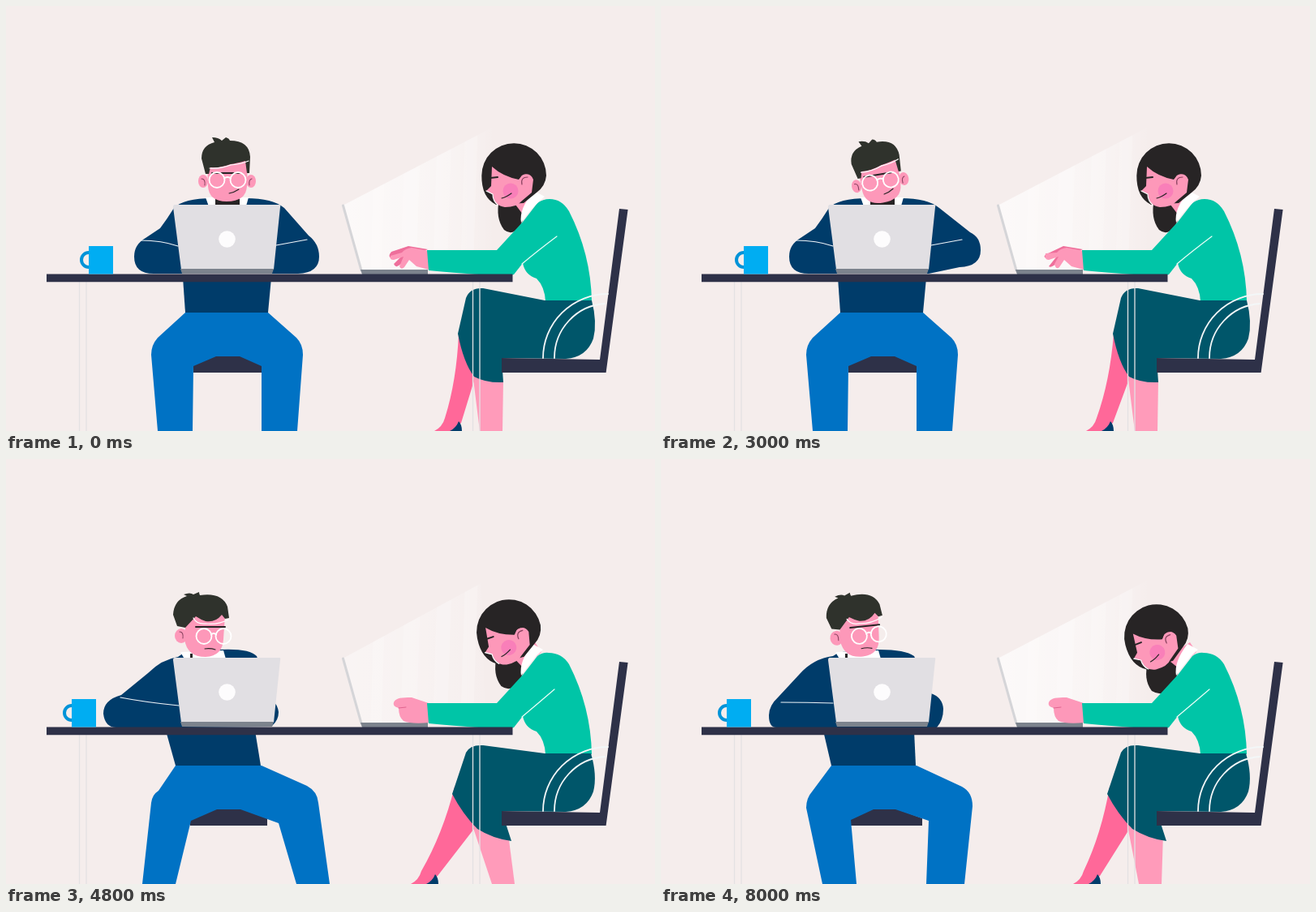
Recreate the animation shown at these times as an HTML page with a canvas. Size 800 by 524 pixels, loop 8.08 s.

```html
<!DOCTYPE html>
<html lang="en">
<head>
<meta charset="utf-8">
<title>Two people at a desk</title>
<style>
html, body { margin: 0; width: 100%; height: 100%; overflow: hidden; background: #f5edec; }
canvas { display: block; }
</style>
</head>
<body>
<canvas id="stage" width="800" height="524"></canvas>
<script>
const ctx = document.getElementById('stage').getContext('2d');
const LOOP = 8080;
const BG = '#f5edec', INK = '#2e3148', NAVY = '#003c6a', BLUE = '#0072c4', SKIN = '#fd98b9',
  ROSE = '#ff6899', BLACK = '#272425', HAIR = '#2f322c', GREEN = '#00c5a7', TEAL = '#00566a',
  STEEL = '#7c838d';

const clamp = v => Math.max(0, Math.min(1, v));
const ease = u => { u = clamp(u); return u * u * (3 - 2 * u); };
const lerp = (a, b, u) => a + (b - a) * u;

// Blend two paths that share the same commands.
function mix(a, b, u) {
  if (u === 0 || a === b) return a;
  const nums = b.match(/-?[\d.]+/g);
  let i = 0;
  return a.replace(/-?[\d.]+/g, n => lerp(+n, +nums[i++], u).toFixed(2));
}

// Eased values of a track of [time, ...values] keys.
function track(t, keys) {
  let i = 0;
  while (i < keys.length - 2 && t >= keys[i + 1][0]) i++;
  const [a, b] = [keys[i], keys[i + 1]];
  const u = ease((t - a[0]) / (b[0] - a[0]));
  return a.slice(1).map((v, k) => lerp(v, b[k + 1], u));
}

function fill(color, d) {
  ctx.fillStyle = color;
  ctx.fill(new Path2D(d));
}
function line(color, width, d) {
  ctx.strokeStyle = color;
  ctx.lineWidth = width;
  ctx.stroke(new Path2D(d));
}
function oval(color, x, y, rx, ry = rx) {
  ctx.fillStyle = color;
  ctx.beginPath();
  ctx.ellipse(x, y, rx, ry, 0, 0, 7);
  ctx.fill();
}
function ring(color, width, x, y, r) {
  ctx.strokeStyle = color;
  ctx.lineWidth = width;
  ctx.beginPath();
  ctx.arc(x, y, r, 0, 7);
  ctx.stroke();
}
function posed(cx, cy, [dx, dy, deg], draw) {
  ctx.save();
  ctx.translate(cx + dx, cy + dy);
  ctx.rotate(deg * Math.PI / 180);
  ctx.translate(-cx, -cy);
  draw();
  ctx.restore();
}

// Poses in order: working, jolt, slouch, rest
const pants = [
  'M221,378 L323,378 L358,409 Q366,417 366,430 L359,524 L315,524 L315,444 L288,432 L259,432 L231,444 L230,524 L187,524 L179,430 Q179,418 187,409 Z',
  'M214,378 L319,378 L366,404 Q375,410 376,422 L380,524 L340,524 L327,447 L289,432 L260,432 L228,446 L218,524 L172,524 L179,424 Q180,412 188,406 Z',
  'M209,378 L315,378 L371,403 Q384,410 385,424 L399,524 L358,524 L336,449 L289,432 L260,432 L228,446 L209,524 L168,524 L179,424 Q180,414 188,409 Z',
  'M210,378 L315,378 L371,404 Q384,411 384,428 L374,524 L327,524 L330,446 L289,432 L262,432 L234,445 L241,524 L199,524 L179,430 Q179,418 187,409 Z'];
const waist = [
  'M218,335 L327,335 L323,378 L221,378 Z',
  'M203,335 L313,335 L319,378 L214,378 Z',
  'M197,335 L307,335 L314,378 L209,378 Z',
  'M200,335 L312,335 L314,378 L210,378 Z'];
const seat = [
  'M231,443 L259,431 L289,431 L315,443 L315,452 L231,452 Z',
  'M227,445 L259,431 L289,431 L322,443 L322,452 L227,452 Z',
  'M227,445 L259,431 L289,431 L322,443 L322,452 L227,452 Z',
  'M233,444 L262,431 L289,431 L322,443 L322,452 L233,452 Z'];
const working = (l, r) =>
  `M260,237 Q220,236 207,249 Q199,262 190,274 L${172 - l},286 Q${158 - l},294 ${158 - l},309 Q${158 - l},330 182,330 L216,330 L330,330 L${360 + r},${330 - r} Q${386 + r},${329 - r} ${386 + r},${309 - r} Q${386 + r},${293 - r} ${373 + r},${283 - r / 2} L343,249 Q328,236 290,237 Z`;
const leaning = [
  'M235,238 Q220,236 212,243 Q196,252 181,267 L154,291 Q132,305 132,320 Q132,333 140,333 L216,333 L330,316 L352,311 Q371,304 371,288 Q370,274 357,267 L311,242 Q300,234 262,235 Z',
  'M235,238 Q222,236 212,244 Q192,247 175,264 L142,291 Q120,297 120,314 Q122,331 136,331 L216,331 L325,330 L328,329 Q336,322 336,312 Q335,303 328,297 L309,243 Q300,233 262,235 Z',
  'M235,238 Q222,236 212,243 Q188,246 171,265 L145,293 Q133,304 133,316 Q133,331 142,331 L216,331 L330,331 L340,331 Q348,322 348,308 Q347,294 333,289 L312,243 Q300,234 262,235 Z'];
const seams = [
  'M166,289 Q192,289 212,296 M333,295 L371,288',
  'M142,302 Q180,300 213,301 M338,268 L346,265',
  'M141,294 Q172,300 213,304 M326,300 L326,300',
  'M148,300 Q180,300 212,301 M326,292 L326,292'];
const skirt = [
  'M567,360 Q572,347 588,348 L664,363 L722,363 Q729,390 724,410 Q716,433 690,435 L611,434 L613,464 Q592,465 577,457 Q564,440 557,404 Z',
  'M567,362 Q572,352 588,353 L664,363 L721,363 Q729,390 724,410 Q716,433 690,435 L611,434 L623,471 Q600,468 581,456 Q563,438 550,413 Z'];

// Front view, then turned view
const hair = [
  'M246,207 L241,188 Q241,172 257,168 L254,162 Q262,162 266,166 L271,162 Q275,163 276,166 Q300,166 301,186 L300,206 L297,206 L295,191 Q284,194 277,195 Q264,200 252,199 L250,207 Z',
  'M211,206 L206,192 Q207,174 223,169 L219,167 Q227,164 231,167 L238,164 Q238,166 239,168 Q266,164 273,182 L275,196 L270,197 L266,192 Q258,202 246,200 Q240,198 234,194 L221,208 Z'];
const face = [
  'M248,190 L249,222 Q250,241 272,241 Q296,241 297,222 L298,190 Z',
  'M222,192 L220,222 Q223,244 246,244 Q267,243 268,222 L270,192 Z'];
const fringe = [
  'M251,200 Q264,201 277,196 Q290,195 299,191',
  'M231,196 Q235,204 246,203 Q260,205 274,198'];
const brow = ['M254,206 L288,206', 'M234,207 L270,207'];
const mouth = ['M275,231 Q281,230 287,226', 'M245,234 Q252,233 258,235'];

function man(t, pose, turn, typing) {
  fill(INK, pose(seat));
  fill(NAVY, pose(waist));
  fill(BLUE, pose(pants));
  fill(NAVY, pose([working(6 * typing.left, 8 * typing.right), ...leaning]));
  line('#eef2f7', 1.2, pose(seams));
  fill('#fff', mix('M246,236 L299,236 L295,250 L251,250 Z', 'M215,238 L268,236 L272,250 L222,250 Z', turn));
  fill(BLACK, mix('M258,236 L288,236 L288,250 L258,250 Z', 'M227,240 L230,240 L230,250 L227,250 Z', turn));

  const move = track(t, [[0, 0, 0, 0], [520, 0, 0, 0], [1680, -3, 0, -1], [3000, -4, 2, -9],
    [3920, -8, 4, -8], [4800, 0, 0, 0], [6200, 7, 0, 3], [7080, -1, 0, -6], [LOOP, -1, 0, -6]]);
  posed(lerp(271, 244, turn), 205, move, () => {
    const x = (a, b) => lerp(a, b, turn);
    const ear = x(243, 216), y = x(214.5, 218.5), left = x(260, 244), right = x(286, 268);
    oval(SKIN, x(302, 260), 216, 6, 8);
    oval(SKIN, ear, x(216, 218), x(6, 8), x(8, 9));
    fill(SKIN, mix(...face, turn));
    fill(HAIR, mix(...hair, turn));
    line('#fff', 1.2, mix(...fringe, turn));
    line(BLACK, 2, mix(...brow, turn));
    line(BLACK, 1.1, mix(...mouth, turn));
    line('#8a4360', 1.1, `M${ear - 2},213 Q${ear + 3},213 ${ear + 2},221`);
    if (turn < .5) line('#8a4360', 1.1, 'M303,213 Q299,214 300,221');
    ring('#fff', 1.8, left, y, 9.5);
    ring('#fff', 1.8, right, y, 9.5);
    line('#fff', 1.8, `M${left + 9},${y - 2} Q${(left + right) / 2},${y - 5} ${right - 9},${y - 2}`);
  });
}

function beam(jolt, slump) {
  const open = mix('M415,246 L599,150 L604,300 L522,325 L438,325 Z',
    'M415,246 L586,153 L590,300 L522,325 L438,325 Z', slump);
  const shape = mix(open, 'M423,243 L586,176 L586,300 L522,325 L438,325 Z', jolt);
  const light = ctx.createLinearGradient(420, 0, 603, 0);
  const glow = 1 - .4 * slump;
  [[0, .68], [.4, .55], [.75, .33], [1, 0]].forEach(([p, a]) =>
    light.addColorStop(p, `rgba(255,255,255,${a * glow})`));
  fill(light, shape);
  ctx.save();
  ctx.clip(new Path2D(shape));
  for (const [x, w] of [[455, 14], [492, 20], [532, 18], [566, 16]])
    fill('rgba(255,255,255,.16)', `M${x},140 h${w} l-6,190 h${-w} Z`);
  ctx.restore();
  line('#d5d5d8', 3, mix('M415.5,246 L438,326', 'M424.5,243 L438,326', jolt));
  fill(STEEL, 'M437,325 L520,325 L520,331 L439,331 Z');
}

function hands(t, reach, typing) {
  if (t > 3450) {
    fill(SKIN, 'M521,301 L500,294 Q480,293 478,300 Q476,305 484,307 Q484,318 490,323 Q500,327 521,325 Z');
    line('#e0648f', 1, 'M484,307 L493,306');
    return;
  }
  const tap = 3 * typing.right;
  ctx.save();
  ctx.translate(reach, 0);
  fill('#ee6f9b', `M520,300 L496,296 L475,${303 + tap} Q470,309 475,311 L490,306 L478,${318 + tap} Q480,323 484,320 L500,309 Z`);
  fill(SKIN, `M521,302 L500,298 Q492,299 488,304 L474,${308 - tap} Q472,313 478,313 L490,309 L485,${321 - tap} Q487,326 491,322 L497,313 L506,321 L521,325 Z`);
  ctx.restore();
}

function woman(t, lean, typing) {
  const move = track(t, [[0, 0, 0, 0], [3120, 0, 0, 0], [3920, -15, 10, -15], [4800, -6, 4, -12],
    [6200, -20, 17, -24], [7080, -15, 10, -15], [LOOP, -15, 10, -15]]);
  const [toe] = track(t, [[0, 528], [520, 528], [1680, 514], [3000, 524], [3920, 514], [4800, 499],
    [5700, 508], [LOOP, 508]]);
  const [shin, calf] = track(t, [[0, 584, 612], [3120, 584, 612], [3920, 594, 625], [4800, 599, 627],
    [6200, 598, 627], [7080, 589, 617], [LOOP, 589, 617]]);
  const reach = 8 * typing.left;
  const [dx, dy] = move;

  fill(BLACK, `M${608 + dx * .5},${238 + dy} Q${603 + dx * .6},${262 + dy} ${614 + dx * .6},${276 + dy} Q${624 + dx * .4},${284 + dy} ${633 + dx * .2},${272 + dy} Q642,258 638,236 Z`);
  fill(SKIN, `M${628 + dx * .4},245 L652,226 L660,238 L638,258 Z`);
  hands(t, reach, typing);
  fill(GREEN, `M${519 + reach},301 L605,301 L638,265 L655,243 Q662,238 ${670 - lean},${238 + lean} Q685,${238 + lean} 694,253 Q721,306 722,364 L665,364 Q664,346 654,336 Q640,332 637,317 L626,331 Q618,335 ${521 + reach},326 Z`);
  line('#eafff9', 1.2, `M636,318 Q655,302 ${679 - 3 * lean},284`);
  fill('#fff', `M${651 - 2 * lean},228 L${664 - 2 * lean},235 Q648,248 635,267 Q632,250 ${651 - 2 * lean},228 Z`);

  posed(626, 210, move, () => {
    fill(BLACK, 'M604,245 Q586,236 586.3,209 A39.8,39.8 0 0 1 666,209 Q665,222 654,230 L638,243 Z');
    fill(SKIN, 'M599,198 L598,222 L592,228 L600,232 Q601,246 615,248 Q630,248 635,241 L648,230 L650,214 Q646,204 636,209 L632,214 Q612,210 599,198 Z');
    oval('#f97fb9', 622, 228, 9.5);
    oval(SKIN, 640, 215, 6.5, 7.5);
    line('#8a4360', 1.2, 'M643,211 Q634,211 636,220');
    line(BLACK, 1.2, 'M611,237 Q616,236 623,231');
    line(BLACK, 2, 'M597,212 L606,211');
    line('#fff', 1.2, 'M592,228 L600,232 Q600,240 606,245');
  });

  const foot = toe + 13, knee = 558 - 5 * lean;
  fill(ROSE, `M${knee},404 L580,452 L${toe + 33},514 L${toe + 20},524 L${toe},524 Q${foot - 3},519 ${foot},508 Q${(knee + foot) / 2 + 6},462 ${knee},404 Z`);
  fill(NAVY, `M${toe + 19},524 Q${toe + 27},520 ${toe + 30},512 Q${toe + 34},516 ${toe + 34},524 Z`);
  fill('#ff9bba', `M575,452 L${613 + 6 * lean},462 L${calf},524 L${shin},524 Z`);
  fill(TEAL, mix(...skirt, lean));
}

function furniture(jolt, mugX) {
  fill(INK, mix('M611,434 L732,436 L756,250 L766.6,251 L739.6,452 L611,452 Z',
    'M609,434 L732,432 L750,248 L760.6,248 L738.6,450 L610,454 Z', jolt));
  const arc = -2 * jolt;
  line('#f3f7f8', 1.8, `M${662 + arc},434 A80,79 0 0 1 ${742 + arc},355 M${676 + arc},434 A66,67 0 0 1 ${738 + arc},367`);
  line('#e4e1e3', 1.3, 'M90.5,340 V524 M99,340 V524 M575.5,340 V524 M584,340 V524');
  fill(INK, `M50,${330.5 + 1.5 * jolt} h574.5 v9.7 h-574.5 Z`);
  ring('#0093d8', 4, 102 + mugX, 313, 9);
  fill('#00adf2', `M${102 + mugX},296 h30 v34.5 h-30 Z`);
}

function laptop(jolt) {
  fill('#e1dfe3', mix('M208,245 L337,245 Q339,245 338,248 L330,325 L216,325 L206,248 Q206,245 208,245 Z',
    'M209,243 L337,244 Q339,244 338,247 L329,324 L216,322 L207,246 Q207,243 209,243 Z', jolt));
  fill(STEEL, mix('M215,324 L330,324 L328,330 L217,330 Z', 'M215,321 L329,323 L327,329 L217,328 Z', jolt));
  oval('#fdfcfd', 272.5, 287.5 - jolt, 10.3);
}

function draw(t) {
  const [stage] = track(t, [[0, 0], [3120, 0], [3920, 1], [4800, 2], [5700, 3], [LOOP, 3]]);
  const pose = list => {
    const i = Math.min(2, Math.floor(stage));
    return mix(list[i], list[i + 1], stage - i);
  };
  const turn = clamp(stage);
  const [jolt] = track(t, [[0, 0], [3700, 0], [3920, 1], [4240, 0], [LOOP, 0]]);
  const [slump] = track(t, [[0, 0], [3700, 0], [3920, 1], [4800, 1], [5500, 0], [LOOP, 0]]);
  const [mugX] = track(t, [[0, 0], [3920, 0], [4600, -21], [LOOP, -21]]);
  const busy = ease((t - 520) / 240) * ease((3300 - t) / 260);
  const swing = Math.cos(Math.PI * (t - 1680) / 880) ** 2;
  const typing = { left: busy * swing, right: busy * (1 - swing) };

  ctx.fillStyle = BG;
  ctx.fillRect(0, 0, 800, 524);
  beam(jolt, slump);
  man(t, pose, turn, typing);
  woman(t, turn, typing);
  furniture(jolt, mugX);
  laptop(jolt);
}

function frame() {
  draw(performance.now() % LOOP);
  requestAnimationFrame(frame);
}
ctx.lineCap = 'round';
ctx.lineJoin = 'round';
frame();
</script>
</body>
</html>
```
